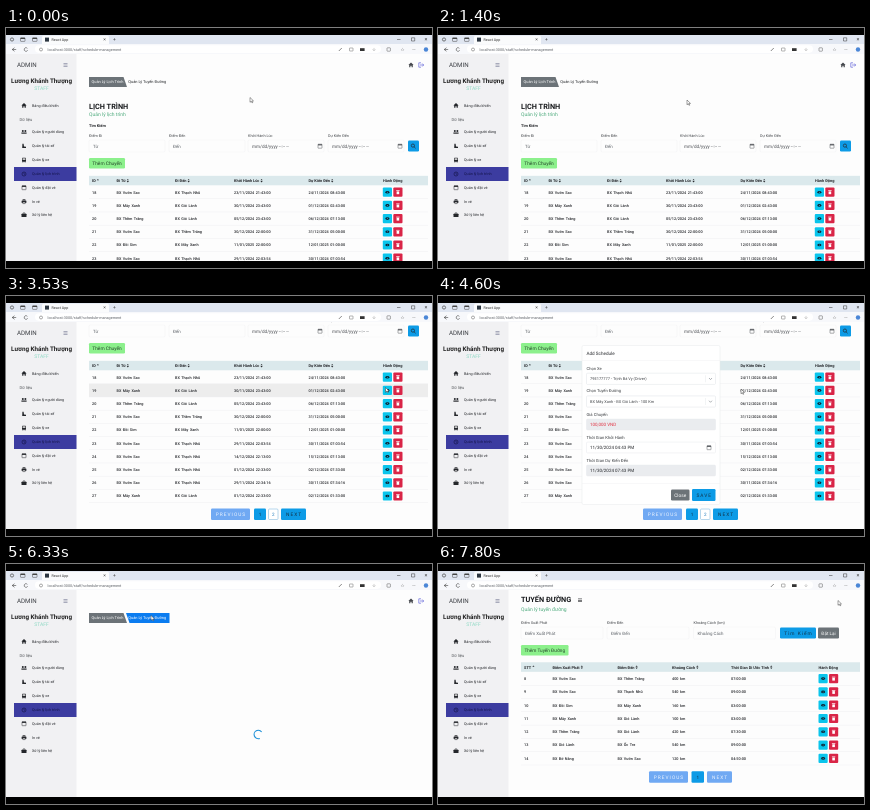
Animation, 426 px wide and 240 px high, one loop 7870 ms. Source, as an HTML page with a canvas:

```html
<!DOCTYPE html>
<html lang="vi">
<head>
<meta charset="utf-8">
<title>Schedule admin</title>
<style>
html, body { margin: 0; width: 100%; height: 100%; overflow: hidden; background: #000; }
canvas { display: block; width: 426px; height: 240px; }
</style>
</head>
<body>
<canvas id="stage"></canvas>
<script>
const W = 426, H = 240, LOOP = 7870;
const cv = document.getElementById('stage');
const c = cv.getContext('2d');
const dpr = window.devicePixelRatio || 1;
cv.width = W * dpr;
cv.height = H * dpr;

const INK = '#25272b', MUTED = '#5d6268', BLUE = '#0d9be6', PALE = '#70a9f3',
      CYAN = '#0bc5ec', RED = '#d92547', GRAY = '#6c7378', GREEN = '#8cf08c', PAGE = '#fdfdfd';

const VS = 'BX Vườn Sao', TN = 'BX Thạch Nhũ', MX = 'BX Mây Xanh', GL = 'BX Gió Lành',
      TT = 'BX Thềm Trăng', DS = 'BX Đồi Sim', OT = 'BX Ốc Tre', BN = 'BX Bờ Nắng';

const trips = [
  [VS, TN, '23/11/2024 21:43:00', '24/11/2024 08:43:00'],
  [MX, GL, '30/11/2024 23:43:00', '01/12/2024 02:43:00'],
  [TT, GL, '05/12/2024 23:43:00', '06/12/2024 07:13:00'],
  [VS, TT, '30/12/2024 22:00:00', '31/12/2024 05:00:00'],
  [DS, MX, '11/01/2025 22:00:00', '12/01/2025 01:00:00'],
  [VS, TN, '29/11/2024 22:03:54', '30/11/2024 07:03:54'],
  [VS, TN, '14/12/2024 22:13:00', '15/12/2024 07:13:00'],
  [VS, TN, '01/12/2024 22:33:00', '02/12/2024 07:33:00'],
  [VS, TN, '29/11/2024 22:34:16', '30/11/2024 07:34:16'],
  [MX, GL, '01/12/2024 22:33:00', '02/12/2024 01:33:00']
].map((r, i) => [String(18 + i), ...r]);

const routes = [
  [VS, TT, '400 km', '07:00:00'],
  [VS, TN, '540 km', '09:00:00'],
  [DS, MX, '160 km', '03:00:00'],
  [MX, GL, '100 km', '03:00:00'],
  [TT, GL, '420 km', '07:30:00'],
  [GL, OT, '540 km', '09:00:00'],
  [BN, VS, '120 km', '04:50:00']
].map((r, i) => [String(8 + i), ...r]);

// [time, value...] tracks, eased between keys
const pointer = [[0, 244, 69.5], [1000, 244, 69.5], [1400, 249, 72], [1900, 262, 82], [2450, 413.5, 110.5],
  [2750, 413.5, 110.5], [3400, 379.5, 91.5], [3900, 379.5, 91.5], [4450, 303, 93], [4650, 303, 93],
  [5050, 242, 197], [5300, 242, 197], [5950, 145, 51.5], [6650, 145, 51.5], [7300, 400, 36.5], [LOOP, 400, 36.5]];
const tripScroll = [[0, 0], [1700, 0], [2150, 83], [5350, 83], [5650, 0], [LOOP, 0]];
const routeScroll = [[0, 0], [6950, 0], [7250, 43], [LOOP, 43]];
const modalShow = [[0, 0], [3750, 0], [4050, 1], [5150, 1], [5400, 0], [LOOP, 0]];
const LOAD = 6150, READY = 6700;

function track(keys, t) {
  let i = 0;
  while (i < keys.length - 2 && t >= keys[i + 1][0]) i++;
  const a = keys[i], b = keys[i + 1];
  const p = Math.min(1, Math.max(0, (t - a[0]) / (b[0] - a[0])));
  const e = p * p * (3 - 2 * p);
  return a.slice(1).map((v, k) => v + (b[k + 1] - v) * e);
}

function text(s, x, y, size, color = INK, weight = 400, align = 'left', gap = 0) {
  c.font = `${weight} ${size}px Roboto, Arial, sans-serif`;
  c.letterSpacing = gap + 'px';
  c.textAlign = align;
  c.fillStyle = color;
  c.fillText(s, x, y + size * 0.36);
}

function rect(x, y, w, h, color) {
  c.fillStyle = color;
  c.fillRect(x, y, w, h);
}

function box(x, y, w, h, fill, stroke, r = 1) {
  c.beginPath();
  c.roundRect(x, y, w, h, r);
  if (fill) { c.fillStyle = fill; c.fill(); }
  if (stroke) { c.strokeStyle = stroke; c.lineWidth = 0.5; c.stroke(); }
}

function poly(pts, fill) {
  c.beginPath();
  for (let i = 0; i < pts.length; i += 2) c.lineTo(pts[i], pts[i + 1]);
  c.closePath();
  c.fillStyle = fill;
  c.fill();
}

function dot(x, y, r, color) {
  c.beginPath();
  c.arc(x, y, r, 0, 7);
  c.fillStyle = color;
  c.fill();
}

function line(color, width, ...pts) {
  c.beginPath();
  for (let i = 0; i < pts.length; i += 2) c.lineTo(pts[i], pts[i + 1]);
  c.strokeStyle = color;
  c.lineWidth = width;
  c.stroke();
}

function ring(x, y, r, color, width = 0.7, from = 0, to = Math.PI * 2) {
  c.beginPath();
  c.arc(x, y, r, from, to);
  c.strokeStyle = color;
  c.lineWidth = width;
  c.stroke();
}

function button(s, x, y, w, h, fill, color, size = 4.7, gap = 0) {
  box(x, y, w, h, fill, null, 1.2);
  text(s, x + w / 2 + gap / 2, y + h / 2, size, color, 400, 'center', gap);
}

function lens(x, y) {
  ring(x - 0.4, y - 0.4, 1.6, INK);
  line(INK, 0.8, x + 0.8, y + 0.8, x + 2.2, y + 2.2);
}

function calendar(x, y, color = INK) {
  box(x - 2, y - 1.8, 4, 4, null, color, 0.3);
  rect(x - 2, y - 1.8, 4, 1.2, color);
}

function bars(x, y, color) {
  for (let i = -1; i < 2; i++) rect(x - 2, y + i * 1.4 - 0.3, 4, 0.6, color);
}

function house(x, y, color) {
  poly([x - 2.6, y, x, y - 2.5, x + 2.6, y, x + 1.8, y, x + 1.8, y + 2.3, x + 0.6, y + 2.3,
    x + 0.6, y + 0.7, x - 0.6, y + 0.7, x - 0.6, y + 2.3, x - 1.8, y + 2.3, x - 1.8, y], color);
}

const icons = {
  home: (x, y) => house(x, y, INK),
  people(x, y) {
    for (const d of [-1.2, 1.4]) {
      dot(x + d, y - 1, 1, INK);
      rect(x + d - 1.4, y + 0.5, 2.6, 1.2, INK);
    }
  },
  driver(x, y) {
    poly([x - 1.6, y - 2.3, x - 0.4, y - 2.3, x, y + 0.4, x + 2, y + 0.8, x + 2, y + 2, x - 1.8, y + 2], INK);
  },
  bus(x, y) {
    box(x - 2, y - 2.3, 4, 4, INK, null, 0.6);
    rect(x - 1.4, y - 1.6, 2.8, 1.4, '#eee');
    rect(x - 1.6, y + 1.5, 0.9, 0.9, INK);
    rect(x + 0.7, y + 1.5, 0.9, 0.9, INK);
  },
  clock(x, y) {
    ring(x, y, 2, '#17174f');
    line('#17174f', 0.6, x, y - 1.2, x, y, x + 1, y + 0.6);
  },
  ticket: (x, y) => calendar(x, y),
  printer(x, y) {
    rect(x - 1.4, y - 2.2, 2.8, 1, INK);
    box(x - 2.4, y - 1, 4.8, 2.4, INK, null, 0.4);
    rect(x - 1.2, y + 0.5, 2.4, 1.6, '#eee');
    box(x - 1.2, y + 0.5, 2.4, 1.6, null, INK, 0);
  },
  bag(x, y) {
    box(x - 1, y - 2.2, 2, 1.4, null, INK, 0.3);
    box(x - 2.5, y - 1.2, 5, 3.3, INK, null, 0.4);
  }
};

const menu = [
  ['home', 'Bảng điều khiển', 77.5], ['people', 'Quản lý người dùng', 104], ['driver', 'Quản lý tài xế', 118],
  ['bus', 'Quản lý xe', 132], ['clock', 'Quản lý lịch trình', 146], ['ticket', 'Quản lý đặt vé', 159.5],
  ['printer', 'In vé', 173.5], ['bag', 'Xử lý liên hệ', 187]
];

function sidebar() {
  rect(0, 26, 70.5, 207, '#f1f1f3');
  text('ADMIN', 11, 37, 6.2, '#3a3d42');
  bars(59.5, 37, '#777b96');
  text('Lương Khánh Thượng', 35.5, 53, 6.3, '#222', 700, 'center');
  text('STAFF', 35.5, 60, 5, '#8ed9c4', 400, 'center');
  text('Dữ liệu', 13.5, 92, 4.1, '#55585c');
  rect(8, 139, 62.5, 14, '#3c3ca0');
  for (const [icon, label, y] of menu) {
    icons[icon](18, y);
    text(label, 26, y, 3.75, icon === 'clock' ? '#15154a' : INK);
  }
}

function chrome() {
  rect(0, 7, W, 9, '#e0e6f1');
  box(36, 7.8, 67, 9, '#fafbfc', null, 1.5);
  ring(6, 11.5, 1.6, '#444');
  for (const x of [14.5, 26.5]) {
    box(x, 9.8, 4.5, 3.6, null, '#444', 0.5);
    rect(x, 9.8, 4.5, 1.2, '#444');
  }
  rect(39, 9.6, 4, 4, '#2b3540');
  text('React App', 45.5, 11.7, 3.7, '#333');
  text('×', 98.5, 11.6, 5, '#444', 400, 'center');
  text('+', 108.5, 11.6, 5, '#444', 400, 'center');
  line('#333', 0.5, 391, 11.5, 394.5, 11.5);
  box(405.5, 9.8, 3.2, 3.2, null, '#333', 0);
  text('×', 420, 11.4, 5.5, '#333', 400, 'center');

  rect(0, 16, W, 10, '#f7f8fb');
  box(29, 17.3, 346, 7.6, '#fff', null, 3.8);
  line('#444', 0.6, 8.5, 19.7, 6.2, 21.5, 8.5, 23.3);
  line('#444', 0.6, 6.2, 21.5, 10.2, 21.5);
  ring(20, 21.5, 1.8, '#444', 0.6, 0.4, 5.6);
  ring(35, 21.5, 1.5, '#555', 0.5);
  text('localhost:3000/staff/schedule-management', 41.5, 21.6, 3.75, '#5c6066');
  line('#555', 0.7, 332.8, 23, 335.8, 20);
  box(343.5, 20, 3.5, 3, null, '#666', 0.3);
  rect(354, 20.2, 4.6, 2.8, '#333');
  text('☆', 368, 21.5, 4.5, '#555', 400, 'center');
  box(381, 19.8, 3.4, 3.4, null, '#555', 0.5);
  text('☆', 396.5, 21.5, 4.5, '#555', 400, 'center');
  text('…', 408, 20.4, 5, '#333', 400, 'center');
  dot(420, 21.5, 2.2, '#4a86d6');
}

function topArea(active, hover) {
  house(405, 37, '#44474c');
  const out = '#6668d8';
  line(out, 0.7, 415, 34.8, 412.8, 34.8, 412.8, 39.2, 415, 39.2);
  line(out, 0.7, 414, 37, 417.7, 37);
  line(out, 0.7, 416.2, 35.5, 417.7, 37, 416.2, 38.5);

  const fills = [active === 0 ? GRAY : null, hover ? '#0b7cf0' : active === 1 ? GRAY : null];
  if (fills[0]) poly([83, 49, 117.5, 49, 121, 59, 83, 59], fills[0]);
  if (fills[1]) poly([120, 49, 163.5, 49, 163.5, 59, 123.5, 59], fills[1]);
  text('Quản Lý Lịch Trình', 85.5, 54, 3.95, fills[0] ? '#fff' : INK);
  text('Quản Lý Tuyến Đường', 122.3, 54, 3.95, fills[1] ? '#fff' : INK);
}

function field(label, hint, x, w, y, date) {
  text(label, x, y - 10.5, 3.8, '#44474b');
  box(x, y - 6, w, 12, PAGE, '#f0f1f3', 1.2);
  text(hint, x + 4, y, date ? 4.6 : 4.4, date ? '#4a4d52' : MUTED);
  if (date) calendar(x + 72, y, '#55585d');
}

function table(top, heads, cols, rows, btnX, first, step, mouse) {
  rect(83, top, 339, 9.5, '#dbe9ec');
  heads.forEach((h, i) => {
    text(h, cols[i], top + 4.9, 3.9, INK, 700);
    if (i === heads.length - 1) return;
    const x = cols[i] + c.measureText(h).width + 2.2, y = top + 4.9;
    poly([x - 1.1, y - 0.4, x, y - 1.7, x + 1.1, y - 0.4], INK);
    if (i) poly([x - 1.1, y + 0.4, x, y + 1.7, x + 1.1, y + 0.4], INK);
  });
  rows.forEach((row, n) => {
    const y = first + n * step;
    const over = mouse && mouse[0] > 83 && Math.abs(mouse[1] - y) < step / 2;
    if (over) rect(83, y - step / 2, 339, step, '#ededed');
    rect(83, y + step / 2 - 0.25, 339, 0.4, '#eaebee');
    c.wordSpacing = '0.5px';
    row.forEach((s, i) => text(s, cols[i], y, 3.8, INK, 500));
    c.wordSpacing = '0px';
    box(btnX, y - 4.6, 9.2, 9.2, CYAN, null, 1);
    c.beginPath();
    c.ellipse(btnX + 4.6, y, 2, 1.3, 0, 0, 7);
    c.fillStyle = '#123';
    c.fill();
    dot(btnX + 4.6, y, 0.5, CYAN);
    box(btnX + 10.5, y - 4.6, 9.2, 9.2, RED, null, 1);
    rect(btnX + 13.4, y - 1.9, 3.4, 0.7, '#fff');
    rect(btnX + 13.8, y - 0.8, 2.6, 2.8, '#fff');
  });
}

function tripPage(mouse) {
  text('LỊCH TRÌNH', 83, 78, 7.3, '#17191c', 700);
  text('Quản lý lịch trình', 83, 86, 5, '#4caa7c');
  text('Tìm Kiếm', 83, 98, 3.9, INK, 700);
  field('Điểm Đi', 'Từ', 83, 76, 118);
  field('Điểm Đến', 'Đến', 163, 76, 118);
  field('Khởi Hành Lúc', 'mm/dd/yyyy --:-- --', 242, 76, 118, true);
  field('Dự Kiến Đến', 'mm/dd/yyyy --:-- --', 322, 76, 118, true);
  box(402, 112.5, 11, 11, BLUE, null, 1.2);
  lens(407.3, 118);
  button('Thêm Chuyến', 83, 130, 36, 10.5, GREEN, '#24452a', 4.8);
  table(147.8, ['ID', 'Đi Từ', 'Đi Đến', 'Khởi Hành Lúc', 'Dự Kiến Đến', 'Hành Động'],
    [86, 110.5, 169, 228, 302.5, 377], trips, 376.8, 164.2, 13.2, mouse);
  button('PREVIOUS', 205, 295.5, 39, 11.5, PALE, '#eef5ff', 4.8, 1);
  button('1', 248, 295.5, 12, 11.5, BLUE, '#12344a', 4.6);
  box(262.5, 296, 9.5, 10.5, '#fff', '#6eaed8', 1);
  text('2', 267.2, 301.2, 4.6, '#267fbe', 400, 'center');
  button('NEXT', 275, 295.5, 25, 11.5, BLUE, '#12344a', 4.8, 1);
}

function routePage(mouse) {
  text('TUYẾN ĐƯỜNG', 83, 78.5, 7.3, '#17191c', 700);
  bars(142, 79.3, INK);
  text('Quản lý tuyến đường', 83, 88.3, 5, '#4caa7c');
  field('Điểm Xuất Phát', 'Điểm Xuất Phát', 83, 82, 112);
  field('Điểm Đến', 'Điểm Đến', 169, 82, 112);
  field('Khoảng Cách (km)', 'Khoảng Cách', 255.5, 82, 112);
  button('Tìm Kiếm', 342, 106.5, 36, 11, BLUE, '#12344a', 4.8, 1);
  button('Đặt Lại', 380, 106.5, 21, 11, GRAY, '#fff', 4.6);
  button('Thêm Tuyến Đường', 83, 124, 47.5, 10.5, GREEN, '#24452a', 4.7);
  table(141.3, ['STT', 'Điểm Xuất Phát', 'Điểm Đến', 'Khoảng Cách', 'Thời Gian Di Ước Tính', 'Hành Động'],
    [86, 114.5, 179.5, 234, 293, 380.5], routes, 380.5, 157.6, 13.3, mouse);
  button('PREVIOUS', 211, 250.3, 39, 11.5, PALE, '#eef5ff', 4.8, 1);
  button('1', 253.5, 250.3, 12.5, 11.5, BLUE, '#12344a', 4.6);
  button('NEXT', 269, 250.3, 25, 11.5, PALE, '#eef5ff', 4.8, 1);
}

function select(label, value, y) {
  text(label, 148.5, y - 10.7, 4.1, '#3d4044');
  box(148.5, y - 5.6, 129, 11.2, '#fff', '#dfe2e6', 1);
  text(value, 152, y, 3.95, '#44474b');
  rect(267, y - 3.5, 0.4, 7, '#dfe2e6');
  line('#8d9298', 0.7, 271, y - 0.8, 272.5, y + 0.8, 274, y - 0.8);
}

function entry(label, value, y, fill, color) {
  text(label, 148.5, y - 10.5, 4.2, '#3d4044');
  box(148.5, y - 5.4, 129, 10.8, fill, '#e6e8ec', 1);
  text(value, 152, y, 4.5, color);
}

function modal(show) {
  if (show <= 0) return;
  c.save();
  c.globalAlpha = show;
  c.translate(0, -11 * (1 - show));
  box(144, 49.5, 138, 159, '#fff', '#e6e8eb', 1.5);
  text('Add Schedule', 148.5, 57.5, 4.6);
  rect(144, 64, 138, 0.4, '#eceef0');
  select('Chọn Xe', '79E177777 - Trịnh Bá Vy (Driver)', 82.8);
  select('Chọn Tuyến Đường', MX + ' - ' + GL + ' - 100 Km', 105.5);
  entry('Giá Chuyến', '100,000 VND', 128.5, '#eaecef', '#e03444');
  entry('Thời Gian Khởi Hành', '11/30/2024 04:43 PM', 151.5, '#fff', INK);
  calendar(271, 151.5, '#55585d');
  entry('Thời Gian Dự Kiến Đến', '11/30/2024 07:43 PM', 174.5, '#eaecef', INK);
  rect(144, 187, 138, 0.4, '#eceef0');
  button('Close', 233, 193.5, 18.5, 11, GRAY, '#fff', 4.8);
  button('SAVE', 254, 193, 23.5, 12, BLUE, '#12344a', 4.8, 1);
  c.restore();
}

function spinner(t) {
  const turn = (t - LOAD) / 1400 * Math.PI * 2;
  const a = turn + 0.4;
  ring(252.3, 170.5, 4.2, '#1b8fd8', 1.1, a, a + 3.7 + Math.sin(turn));
}

function arrow(x, y) {
  const pts = [0, 0, 0, 4.8, 1.2, 3.7, 2, 5.4, 2.7, 5.1, 1.9, 3.5, 3.5, 3.4].map((v, i) => v + (i % 2 ? y : x));
  poly(pts, '#fff');
  c.strokeStyle = '#333';
  c.lineWidth = 0.45;
  c.stroke();
}

function draw(t) {
  const [mx, my] = track(pointer, t);
  const loading = t >= LOAD && t < READY;
  const ready = t >= READY;
  const scroll = track(ready ? routeScroll : tripScroll, t)[0];
  const show = track(modalShow, t)[0];
  const py = my + scroll;
  const tabOver = mx > 121 && mx < 163 && py > 49 && py < 59;

  c.setTransform(dpr, 0, 0, dpr, 0, 0);
  c.textBaseline = 'alphabetic';
  c.textRendering = 'geometricPrecision';
  rect(0, 0, W, H, '#000');
  c.save();
  c.beginPath();
  c.rect(0, 7, W, 226);
  c.clip();
  rect(0, 26, W, 207, PAGE);
  c.save();
  c.translate(0, -scroll);
  topArea(ready ? 1 : 0, tabOver);
  const mouse = show > 0 ? null : [mx, py];
  if (ready) routePage(mouse);
  else if (!loading) tripPage(mouse);
  c.restore();
  if (loading) spinner(t);
  sidebar();
  modal(show);
  chrome();
  arrow(mx, my);
  c.restore();
}

const start = performance.now();
function tick() {
  draw((performance.now() - start) % LOOP);
  requestAnimationFrame(tick);
}
tick();
</script>
</body>
</html>
```
